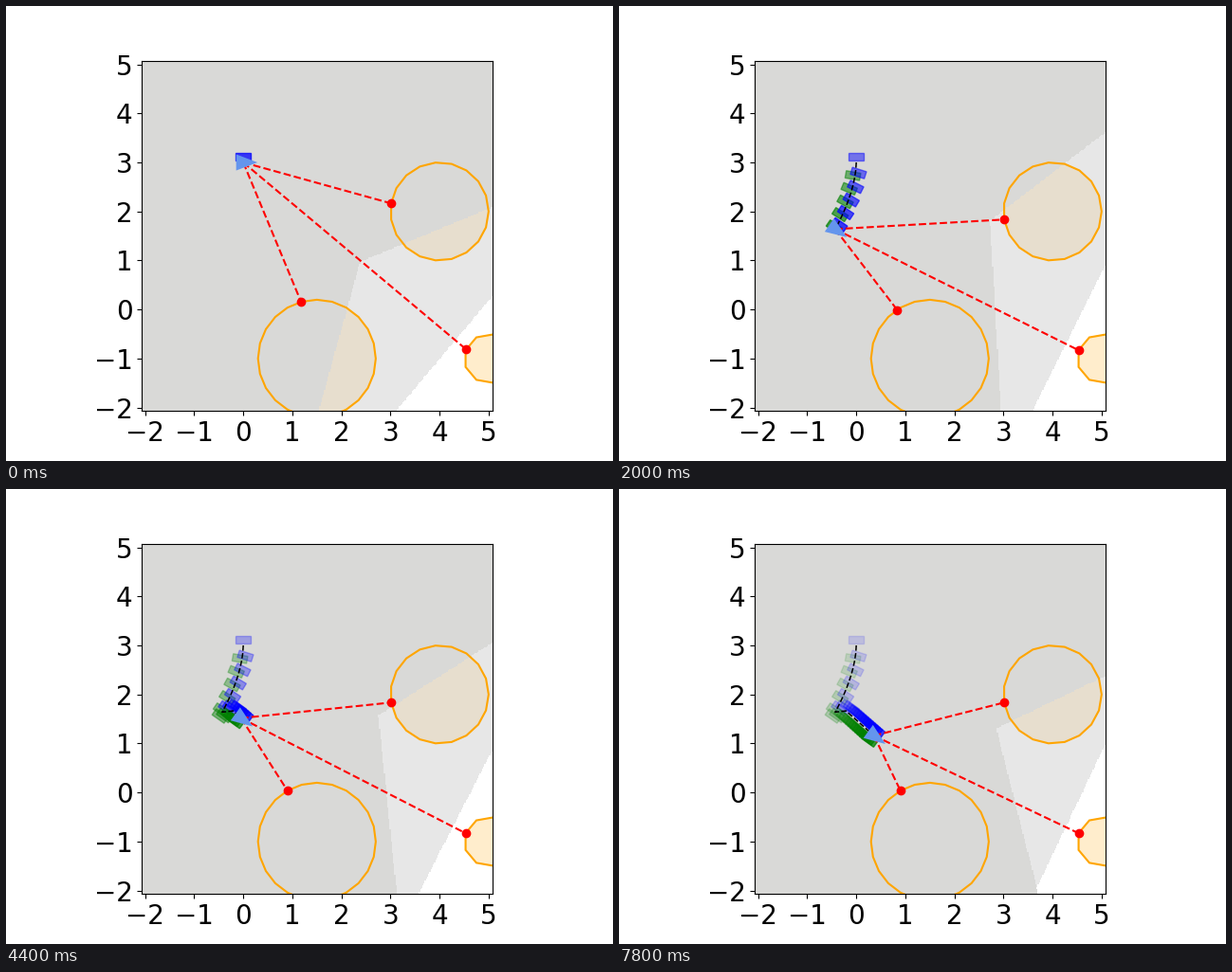
Recreate the animation shown at these times as a matplotlib script. Size 640 by 480 pixels, loop 8000 ms.

```python
import numpy as np
import matplotlib.pyplot as plt
from matplotlib.animation import FuncAnimation
from matplotlib.patches import Polygon

FRAMES, INTERVAL = 40, 200
LOW, HIGH = -2.0675, 5.076
MARGIN = 0.29      # safety distance kept from each obstacle
HALF_STEP = 0.12   # distance from body to foot
FADE = 0.955

START, BEND, PAUSE, END = (0, 3), (-.43, 1.64), (-.21, 1.665), (.36, 1.16)
BEND_STEP, PAUSE_STEP = 10, 15


def walk(k):
    """Body position: a curved descent, then two straight stretches."""
    s = np.minimum(k / BEND_STEP, 1)
    bow = np.column_stack([s ** 1.6, s ** .92])
    descent = START + np.subtract(BEND, START) * bow
    marks = [BEND_STEP, PAUSE_STEP, FRAMES - 1]
    rest = [np.interp(k, marks, v) for v in zip(BEND, PAUSE, END)]
    return np.where(s[:, None] < 1, descent, np.column_stack(rest))


def turn(k, final, pace):
    """Angle that settles from zero to the final value."""
    return np.radians(final) * (1 - np.exp(-k / pace))


def ring(x, y, r, sides):
    t = np.arange(sides) * 2 * np.pi / sides
    return np.column_stack([x + r * np.cos(t), y + r * np.sin(t)])


def rotated(points, angle, center):
    c, s = np.cos(angle), np.sin(angle)
    return np.array(points) @ np.array([[c, s], [-s, c]]) + center


def nearest(p, poly):
    """Closest point to p on the outline of poly."""
    edge = np.roll(poly, -1, axis=0) - poly
    t = np.sum((p - poly) * edge, axis=1) / np.sum(edge ** 2, axis=1)
    q = poly + np.clip(t, 0, 1)[:, None] * edge
    return q[np.argmin(np.hypot(*(q - p).T))]


steps = np.arange(FRAMES)
body = walk(steps)
heading = turn(steps, -36, 3)
lean = turn(steps, -45, 1)
side = np.where(steps % 2 == 0, HALF_STEP, -HALF_STEP)
feet = body + side[:, None] * np.column_stack([-np.sin(lean), np.cos(lean)])

obstacles = [ring(1.5, -1, 1.2, 24), ring(4, 2, 1, 19), ring(5, -1, .5, 9)]

fig, ax = plt.subplots(figsize=(6.4, 4.8), dpi=100)

for poly in obstacles:
    ax.add_patch(Polygon(poly, fc="orange", alpha=.2, lw=0, zorder=1))
    ax.add_patch(Polygon(poly, fill=False, ec="orange", lw=1.5, zorder=3))

N = 300
cell = (HIGH - LOW) / N
axis = LOW + (np.arange(N) + .5) * cell
gx, gy = np.meshgrid(axis, axis)
shade = ax.imshow(np.zeros((N, N, 4)), extent=(LOW, HIGH, LOW, HIGH),
                  origin="lower", interpolation="nearest", zorder=2)

foot_shape = [(-.15, -.075), (.15, -.075), (.15, .075), (-.15, .075)]
body_shape = [(-.145, -.165), (.29, 0), (-.145, .165)]
prints = [ax.add_patch(Polygon(rotated(foot_shape, heading[i], feet[i]),
                               color="green" if i % 2 else "blue", zorder=4))
          for i in steps]
trail, = ax.plot([], [], "k--", lw=1.1, zorder=5)
rays = [ax.plot([], [], "r--", lw=1.5, zorder=6)[0] for _ in obstacles]
dots, = ax.plot([], [], "ro", ms=6, zorder=7)
robot = ax.add_patch(Polygon(body_shape, fc="cornflowerblue", lw=0, zorder=8))

ax.set_xlim(LOW, HIGH)
ax.set_ylim(LOW, HIGH)
ax.set_aspect("equal")
ax.set_xticks(range(-2, 6))
ax.set_yticks(range(-2, 6))
ax.tick_params(labelsize=20)


def safe_side(p, q):
    n = (q - p) / np.hypot(*(q - p))
    return (gx - q[0]) * n[0] + (gy - q[1]) * n[1] < -MARGIN


def update(k):
    p = body[k]
    hits = [nearest(p, poly) for poly in obstacles]
    for ray, q in zip(rays, hits):
        ray.set_data(*zip(p, q))
    dots.set_data(*zip(*hits))

    a, b, c = (safe_side(p, q) for q in hits)
    img = np.zeros((N, N, 4))
    img[c] = (.816, .816, .816, .51)
    img[a | b] = (.851, .851, .847, 1)
    shade.set_data(img)

    for i, foot in enumerate(prints):
        foot.set_visible(i <= k)
        foot.set_alpha(.75 * FADE ** max(k - i, 0))
    trail.set_data(*body[:k + 1].T)
    robot.set_xy(rotated(body_shape, heading[k], p))
    return [shade, trail, dots, robot, *rays, *prints]


anim = FuncAnimation(fig, update, frames=FRAMES, interval=INTERVAL,
                     repeat=True, repeat_delay=0, blit=False)
plt.show()
```
